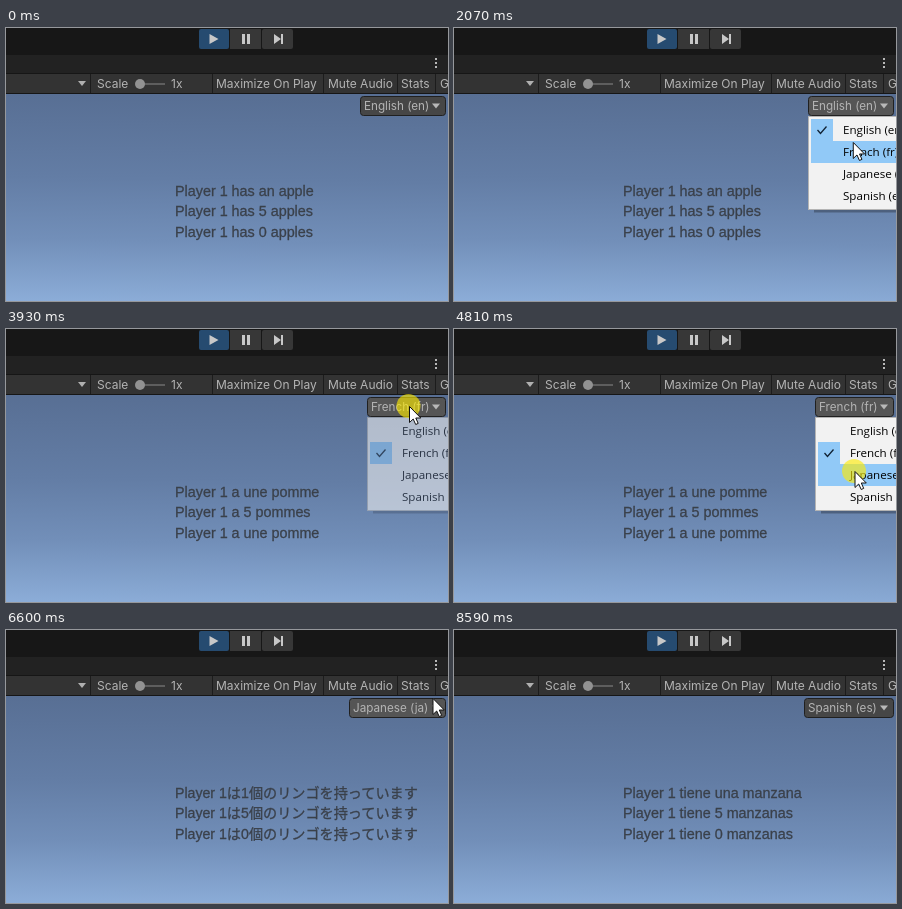
These frames come from a looping animation (442 by 273 pixels, 9390 ms). An HTML page:

```html
<!DOCTYPE html>
<html lang="en">
<head>
<meta charset="utf-8">
<title>Locale switcher</title>
<style>
  html, body { margin: 0; width: 100%; height: 100%; overflow: hidden; background: #181818; }
  svg { display: block; }
  text { white-space: pre; }
  .ui { font: 12px Inter, sans-serif; fill: #b4b4b4; }
  .scene {
    font-family: "Liberation Sans", "Noto Sans CJK JP", "Noto Sans CJK", sans-serif;
    fill: #3a404a; stroke: #3a404a; stroke-width: .3;
  }
  .menu { font: 11.6px "Open Sans", "Noto Sans", sans-serif; fill: #000; }
  #label { font-size: 11.7px; }
</style>
</head>
<body>
<svg width="442" height="273" viewBox="0 0 442 273">
  <defs>
    <linearGradient id="sky" x1=".03" y1="0" x2="0" y2="1">
      <stop offset="0" stop-color="#586f94"/>
      <stop offset=".4" stop-color="#637da5"/>
      <stop offset=".7" stop-color="#728fb9"/>
      <stop offset="1" stop-color="#8cadd8"/>
    </linearGradient>
  </defs>

  <!-- Editor toolbars -->
  <rect width="442" height="27" fill="#171717"/>
  <rect y="27" width="442" height="18" fill="#222"/>
  <rect y="45" width="442" height="21" fill="#161616"/>
  <rect y="46" width="442" height="19" fill="#333"/>
  <rect x="193" y="1" width="30" height="20" rx="2" fill="#264b70"/>
  <rect x="224" y="1" width="31" height="20" fill="#373737"/>
  <rect x="256" y="1" width="31" height="20" rx="2" fill="#373737"/>
  <path d="M203.500 6l9 5-9 5zM236 6h3v10h-3zM241 6h3v10h-3zM268 6l7 5-7 5zM275 6h2v10h-2z" fill="#c8c8c8"/>
  <path d="M429 30h2v2h-2zM429 34h2v2h-2zM429 38h2v2h-2z" fill="#b8b8b8"/>
  <path d="M84.5 46v19M206.500 46v19M317.500 46v19M391.500 46v19M429.500 46v19" stroke="#1c1c1c"/>
  <path d="M72 53h8l-4 5z" fill="#b0b0b0"/>
  <path d="M134 56h25" stroke="#5e5e5e" stroke-width="2"/>
  <circle cx="134" cy="56" r="5" fill="#929292"/>
  <g class="ui">
    <text x="91" y="60">Scale</text>
    <text x="165" y="60">1x</text>
    <text x="210" y="60">Maximize On Play</text>
    <text x="322" y="60">Mute Audio</text>
    <text x="395" y="60">Stats</text>
    <text x="434" y="60">G</text>
  </g>

  <!-- Game view -->
  <rect y="66" width="442" height="207" fill="url(#sky)"/>
  <g class="scene" id="lines">
    <text x="169" y="168"/>
    <text x="169" y="187.500"/>
    <text x="169" y="208.500"/>
  </g>
  <rect id="button" y="68.500" height="19" rx="3" stroke="#202020"/>
  <text class="ui" id="label" y="82"/>
  <path d="M426 75.500h8l-4 5z" fill="#b8b8b8"/>

  <g id="popup" class="menu">
    <g id="panel">
      <rect x="6" y="94" width="150" height="90.500" fill="#000" opacity=".28"/>
      <rect x=".5" y="88.500" width="150" height="93" fill="#f2f2f2" stroke="#b4b4b4"/>
      <g id="check">
        <rect x="3" width="22" height="22" fill="#91c9f7"/>
        <path d="M9.500 11l3 3.500 6-7" fill="none" stroke="#123" stroke-width="1.300"/>
      </g>
    </g>
    <rect id="hover" x="3" width="145" height="22" fill="#91c9f7"/>
    <path id="hoverCheck" d="M9.500 11l3 3.500 6-7" fill="none" stroke="#123" stroke-width="1.300"/>
    <g id="items"></g>
  </g>

  <g id="cursor">
    <circle id="click" cx="-.5" r="12" fill="#ffeb00" opacity=".62"/>
    <path d="M.5 .5V16.500L4.200 13 6.700 18.500 9.200 17.400 6.800 12H11.800Z" fill="#fff" stroke="#111"/>
  </g>
</svg>

<script>
const DURATION = 9390, ROW = 22, MENU_TOP = 91, FADE_IN = 140, FADE_OUT = 260;

const locales = [
  { name: 'English (en)', x: 354, size: 14.35, lines: ['has an apple', 'has 5 apples', 'has 0 apples'].map(s => ' ' + s) },
  { name: 'French (fr)', x: 361, size: 14.35, lines: ['a une pomme', 'a 5 pommes', 'a une pomme'].map(s => ' ' + s) },
  { name: 'Japanese (ja)', x: 343, size: 14.15, lines: [1, 5, 0].map(n => `は${n}個のリンゴを持っています`) },
  { name: 'Spanish (es)', x: 350, size: 14.35, lines: ['una manzana', '5 manzanas', '0 manzanas'].map(s => ' tiene ' + s) }
];

// Each menu opens, then closes by picking the next locale.
const menus = [
  { open: 1320, close: 2680 },
  { open: 3860, close: 4940 },
  { open: 6800, close: 7690 }
];
const clicks = [[1320, 1450], [2480, 2680], [3860, 3990], [4810, 4940], [6800, 6930], [7560, 7690]];

// start, end, steps, x, y
const moves = [
  [330, 1250, 14, 384, 76],
  [1720, 2210, 8, 401.5, 121],
  [2950, 3380, 7, 403, 77],
  [4060, 4610, 8, 400.5, 142],
  [5200, 6600, 20, 426.5, 68],
  [7000, 7360, 6, 421.5, 168.5],
  [8100, 8590, 8, 429, 280]
];

const $ = id => document.getElementById(id);
const clamp = v => Math.max(0, Math.min(1, v));
const smooth = v => v * v * (3 - 2 * v);
const set = (id, attrs) => {
  for (const key in attrs) $(id).setAttribute(key, attrs[key]);
};
const at = (x, y) => `translate(${x} ${y})`;
const rowY = i => MENU_TOP + i * ROW;

const items = locales.map(({ name }, i) => {
  const item = document.createElementNS('http://www.w3.org/2000/svg', 'text');
  item.setAttribute('x', 35);
  item.setAttribute('y', rowY(i) + 15);
  item.textContent = name;
  return $('items').appendChild(item);
});

function cursorAt(t) {
  let x = 424, y = 232;
  for (const [start, end, steps, toX, toY] of moves) {
    if (t < start) break;
    const step = Math.floor((t - start) / (end - start) * (steps - 1)) + 1;
    const p = smooth(clamp(step / steps));
    x += (toX - x) * p;
    y += (toY - y) * p;
  }
  return { x, y };
}

function drawPopup(t, cursor) {
  const index = menus.findIndex(m => t >= m.open && t < m.close + FADE_OUT);
  set('popup', { visibility: index < 0 ? 'hidden' : 'inherit' });
  if (index < 0) return false;

  const { open, close } = menus[index];
  const closing = t >= close;
  const row = closing ? index + 1 : Math.floor((cursor.y - MENU_TOP) / ROW);
  const hovering = row >= 0 && row < locales.length;
  const opacity = closing ? 1 - (t - close) / FADE_OUT : clamp(.15 + (t - open) / FADE_IN * .85);

  set('popup', { transform: at(locales[index].x, 0), opacity });
  set('panel', { display: closing ? 'none' : 'inline' });
  set('check', { transform: at(0, rowY(index)) });
  set('hover', { y: rowY(row), display: hovering ? 'inline' : 'none' });
  set('hoverCheck', { transform: at(0, rowY(row)), display: !closing && row === index ? 'inline' : 'none' });
  items.forEach((item, i) => item.setAttribute('display', closing && i !== row ? 'none' : 'inline'));
  return !closing;
}

function draw(t) {
  const cursor = cursorAt(t);
  const { name, x, size, lines } = locales[menus.filter(m => t >= m.close).length];
  const menuOpen = drawPopup(t, cursor);
  const overButton = t >= 330 && cursor.x >= x && cursor.x < 440 && cursor.y >= 68 && cursor.y < 88;

  set('button', { x: x + .5, width: 439 - x, fill: menuOpen || overButton ? '#555' : '#464646' });
  set('label', { x: x + 4 });
  $('label').textContent = name;
  set('lines', { 'font-size': size });
  lines.forEach((line, i) => { $('lines').children[i].textContent = 'Player 1' + line; });

  set('cursor', {
    transform: at(cursor.x, cursor.y),
    visibility: t >= 330 && t < 8590 ? 'visible' : 'hidden'
  });
  set('click', { display: clicks.some(([down, up]) => t >= down && t < up) ? 'inline' : 'none' });
}

const begin = performance.now();
function frame() {
  draw((performance.now() - begin) % DURATION);
  requestAnimationFrame(frame);
}
frame();
</script>
</body>
</html>
```
